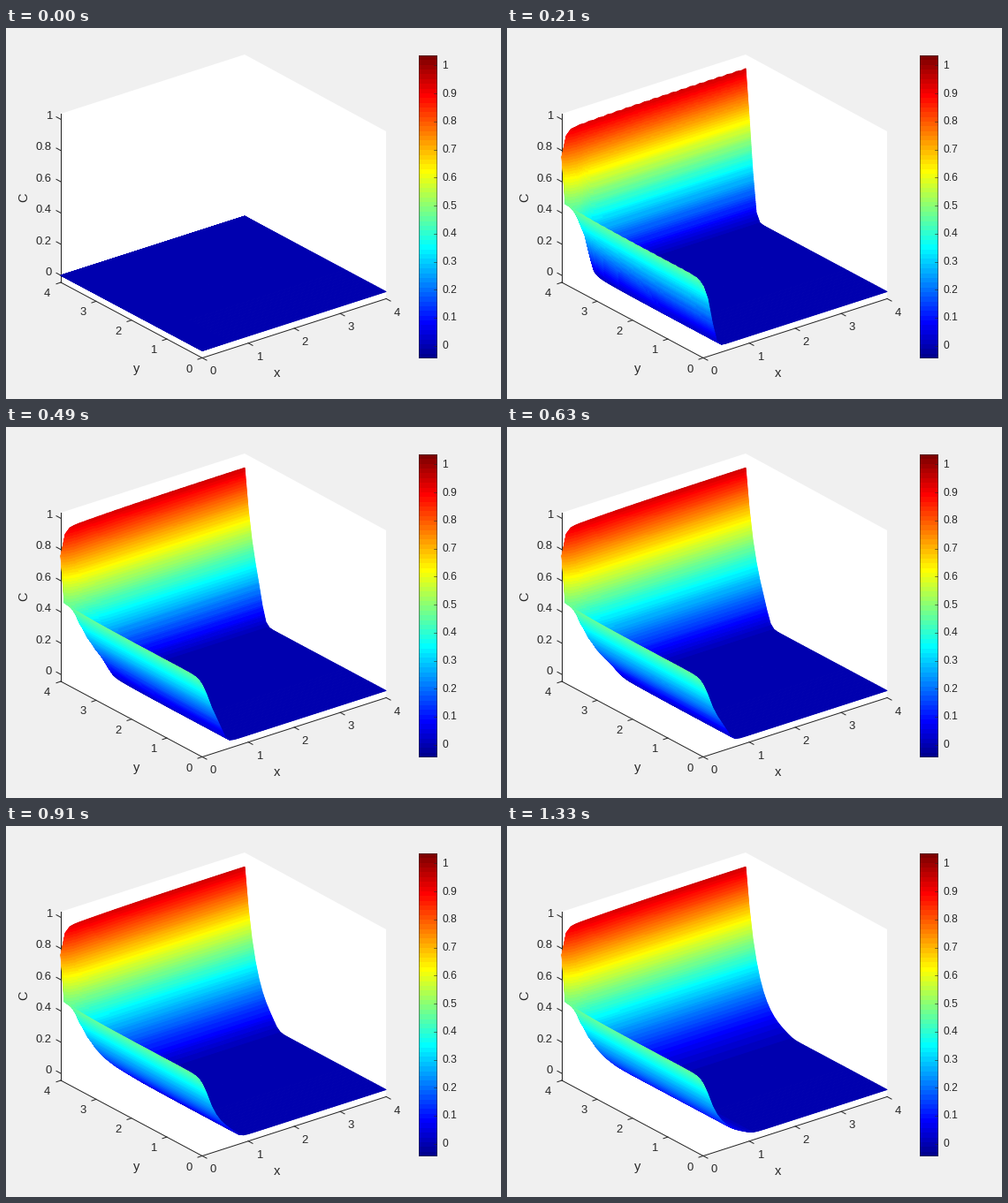
These frames come from a looping animation (560x420 px, 1.4 s). A matplotlib script:

```python
import numpy as np
import matplotlib.pyplot as plt
from matplotlib.animation import FuncAnimation
from matplotlib.collections import PolyCollection

W, H, DPI = 560, 420, 100
FRAMES, INTERVAL = 20, 70
PX = 72 / DPI                      # points per pixel
INK = (0.15, 0.15, 0.15)
ZMIN, ZMAX = -0.045, 1.036
SCALE = 191 / (ZMAX - ZMIN)        # pixels per unit of z
H_MESH, CELLS = 0.1, 40


def jet64():
    j = np.arange(1, 65)
    ramp = lambda lo, hi: np.clip(np.minimum(j - lo, hi - j) / 16, 0, 1)
    return np.stack([ramp(24, 72), ramp(8, 56), ramp(-8, 40)], axis=1)


JET = jet64()


def project(x, d, z):
    """Screen position of a point; d is the distance from the y = 4 side."""
    px = 62 + 52 * x + 40 * d
    py = 288 - 16.75 * x + 21.35 * d - (z - ZMIN) * SCALE
    return px, py


def refined(first, least):
    """Node coordinates with extra points in the first, steep cells."""
    parts = []
    for k in range(CELLS):
        n = max(least, first // (k + 1))
        parts.append(k + np.arange(n) / n)
    return np.append(np.concatenate(parts), CELLS)


def lerp_weights(s):
    k = np.minimum(s.astype(int), CELLS - 1)
    return k, s - k


NODES = np.arange(CELLS + 1) * H_MESH
SIGN = (-1.0) ** np.arange(CELLS + 1)
XS, DS = refined(26, 3), refined(56, 1)
XK, XF = lerp_weights(XS)
DK, DF = lerp_weights(DS)
XG, DG = np.meshgrid(XS * H_MESH, DS * H_MESH)


def front(s, pos, width):
    return 1 / (1 + np.exp(np.clip((s - pos) / width, -50, 50)))


def concentration(n):
    """Nodal values, rows along d and columns along x."""
    if n == 0:
        return np.zeros((CELLS + 1, CELLS + 1))
    wobble = 1 / n ** 2
    x, d = NODES[None, :], NODES[:, None]

    # steady profiles from both sides, cut off by two moving fronts
    width = 0.025 + 0.02 * (1 - wobble) + 0.0015 * n
    y_front = np.interp(n, [1, 3, 7, 19], [0.04, 0.22, 0.52, 1.27])
    x_front = np.interp(n, [1, 3, 7, 11, 19], [0.1, 0.22, 0.46, 0.68, 1.0])
    x_front = x_front + 0.15 * (1 - wobble) * np.exp(-d / 0.8)
    p = 0.945 * np.exp(-d / 0.325)
    q = 0.455 * np.exp(-x / 0.345)
    ahead = (1 - front(d, y_front, width)) * (1 - front(x, x_front, width))
    c = (p ** 4 + q ** 4) ** 0.25 * (1 - ahead)
    c[:, 1] = 0.85 * c[:, 1] + 0.15 * q[0, 1]

    # inflow edge x = 0
    c[:, 0] = 0.45 + 0.025 * np.exp(-NODES / 0.5) + 0.012 * wobble * SIGN
    c[:, 0] *= 1 - (0.08 + 0.07 * wobble) * np.exp((NODES - 4) / 0.1)
    c[1:, 2] += 0.014 * wobble * SIGN[1:]

    # inflow edge y = 4
    ridge = 0.945 - (0.02 + 0.05 * wobble) * np.exp(-NODES / 1.2)
    ridge *= 1 - 0.2 * np.exp(-NODES / 0.06)
    c[0] = ridge + 0.022 * wobble * SIGN * (1 - np.exp(-NODES / 0.3))
    c[0, 0] = 0.76
    return c


def refine(c):
    rows = c[DK] * (1 - DF)[:, None] + c[DK + 1] * DF[:, None]
    return rows[:, XK] * (1 - XF) + rows[:, XK + 1] * XF


def quads(n):
    """Screen quads of the surface, far to near, with their colours."""
    z = refine(concentration(n))
    pts = np.stack(project(XG, DG, z), axis=-1)[:, ::-1]
    z = z[:, ::-1]
    verts = np.stack([pts[:-1, :-1], pts[:-1, 1:], pts[1:, 1:], pts[1:, :-1]], axis=2)
    mean = (z[:-1, :-1] + z[:-1, 1:] + z[1:, 1:] + z[1:, :-1]) / 4
    index = (mean - ZMIN) / (ZMAX - ZMIN) * 64
    colors = JET[np.clip(index.astype(int), 0, 63)]
    return verts.reshape(-1, 4, 2), colors.reshape(-1, 3)


fig = plt.figure(figsize=(W / DPI, H / DPI), dpi=DPI, facecolor="#f0f0f0")
ax = fig.add_axes([0, 0, 1, 1])
ax.axis("off")


def line(x0, y0, x1, y1, width=1.0, z=2):
    ax.plot([x0, x1], [y0, y1], color=INK, lw=width * PX, zorder=z)


def label(x, y, text, size, ha="center", **kw):
    ax.text(x, y, text, fontsize=size * PX, family="Liberation Sans",
            color=INK, ha=ha, va="center", zorder=6, **kw)


def draw_box():
    hexagon = [(62, 97), (270, 30), (430, 117), (430, 306.5), (222, 373.5), (62, 288)]
    ax.add_patch(plt.Polygon(hexagon, fc="white", ec="none", zorder=1))
    line(62, 97, 62, 288)
    line(62, 288, 222, 373.5)
    line(222, 373.5, 430, 306.5)
    for k in range(6):
        x, y = project(0, 0, k / 5)
        line(x, y, x - 5, y - 2.7)
        label(52, y - 3.2, f"{k / 5:g}", 13, ha="right")
    for k in range(5):
        x, y = project(0, 4 - k, ZMIN)
        line(x, y, x - 5, y + 1.7)
        label(46.7 + 40 * (4 - k), 300.5 + 21.6 * (4 - k), str(k), 13)
        x, y = project(k, 4, ZMIN)
        line(x, y, x + 5, y + 2.7)
        label(234.3 + 52 * k, 389 - 16.5 * k, str(k), 13)
    label(307, 391, "x", 14.67)
    label(148, 386, "y", 14.67)
    label(20, 192, "C", 14.67, rotation=90)


def draw_colorbar():
    left, right, top, bottom = 467, 488, 31, 374
    ax.imshow(JET[::-1, None, :], extent=(left, right, bottom, top),
              aspect="auto", interpolation="nearest", zorder=3)
    ax.add_patch(plt.Rectangle((left, top), right - left - 1, bottom - top - 1,
                               fill=False, ec=INK, lw=0.5 * PX, zorder=4))
    for k in range(11):
        y = bottom - (k / 10 - ZMIN) / (ZMAX - ZMIN) * (bottom - top)
        line(right - 4, y, right - 1, y, 0.6, 5)
        label(493, y + 0.5, f"{k / 10:g}", 12, ha="left")


draw_box()
draw_colorbar()
verts, colors = quads(0)
surface = PolyCollection(verts, facecolors=colors, edgecolors="face",
                         linewidths=0.9 * PX, zorder=3)
ax.add_collection(surface, autolim=False)
ax.set_xlim(0, W)
ax.set_ylim(H, 0)


def update(n):
    verts, colors = quads(n)
    surface.set_verts(verts)
    surface.set_facecolor(colors)
    return (surface,)


anim = FuncAnimation(fig, update, frames=FRAMES, interval=INTERVAL,
                     repeat=True, repeat_delay=0, blit=False)
plt.show()
```
